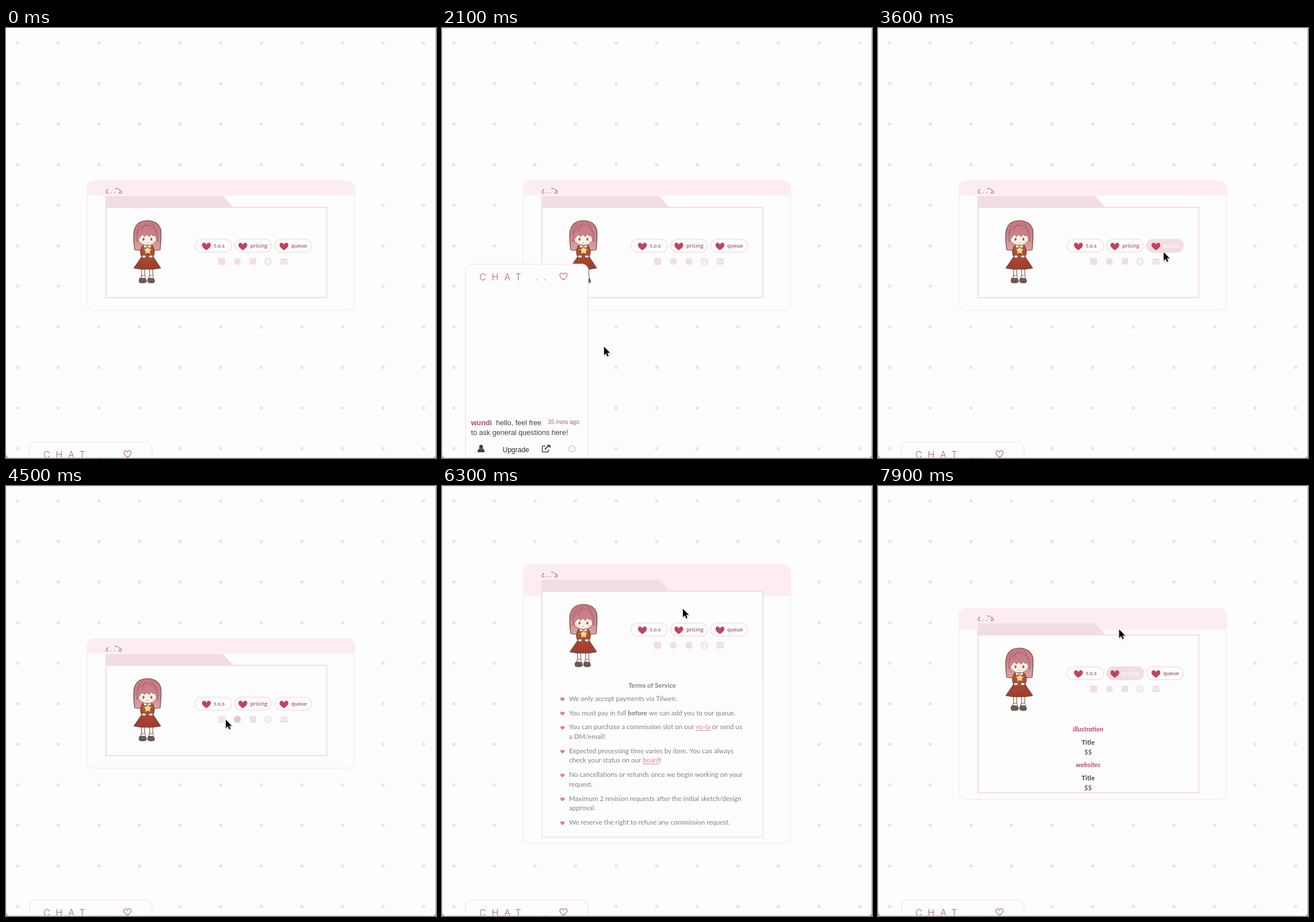
Animation of 748 by 748 pixels, one loop 8 s. Source, as an HTML page with a canvas:

```html
<!DOCTYPE html>
<html lang="en">
<head>
<meta charset="utf-8">
<title>Commission page</title>
<style>
  html, body { margin: 0; width: 100%; height: 100%; overflow: hidden; background: #fdfdfd; }
  canvas { display: block; width: 748px; height: 748px; }
</style>
</head>
<body>
<canvas id="stage"></canvas>
<script>
const SIZE = 748, LOOP = 8000;
const canvas = document.getElementById('stage');
const g = canvas.getContext('2d');
const dpr = window.devicePixelRatio || 1;
canvas.width = canvas.height = SIZE * dpr;

const PAPER = '#fdfdfd', BLUSH = '#fdedf2', PINK = '#f2dde5', ROSE = '#c0455c',
      INK = '#4a3f44', MAUVE = '#ab6371', LINE = '#6a4743';
const SANS = '"Liberation Sans", Arial, sans-serif';
const BODY = 'Lato, sans-serif';

// ---------- timing helpers ----------
const clamp = v => Math.max(0, Math.min(1, v));
const ramp = (t, start, dur) => clamp((t - start) / dur);
const mix = (a, b, k) => a + (b - a) * k;

function bezier(x1, y1, x2, y2) {
  const at = (a, b, s) => 3 * a * s * (1 - s) ** 2 + 3 * b * s * s * (1 - s) + s ** 3;
  return x => {
    if (x <= 0 || x >= 1) return clamp(x);
    let lo = 0, hi = 1;
    for (let i = 0; i < 22; i++) {
      const mid = (lo + hi) / 2;
      if (at(x1, x2, mid) < x) lo = mid; else hi = mid;
    }
    return at(y1, y2, lo);
  };
}
const ease = bezier(.25, .1, .25, 1);
const easeInOut = bezier(.42, 0, .58, 1);

const hover = (t, spans) => spans.reduce((k, [a, b]) =>
  Math.max(k, Math.min(ramp(t, a, 200), 1 - ramp(t, b, 220))), 0);

// ---------- drawing helpers ----------
function paint(p, fill, stroke, width = 1) {
  if (fill) { g.fillStyle = fill; g.fill(p); }
  if (stroke) { g.strokeStyle = stroke; g.lineWidth = width; g.stroke(p); }
}
function path(build, ...style) {
  const p = new Path2D();
  build(p);
  paint(p, ...style);
}
const shape = (d, ...style) => paint(new Path2D(d), ...style);
const oval = (x, y, rx, ry, ...style) =>
  path(p => p.ellipse(x, y, rx, ry, 0, 0, Math.PI * 2), ...style);
const box = (x, y, w, h, r, ...style) =>
  path(p => p.roundRect(x, y, w, h, r), ...style);
const rect = (x, y, w, h, fill) => { g.fillStyle = fill; g.fillRect(x, y, w, h); };

function heart(x, y, w, h, ...style) {
  const a = w / 2, b = h / 2;
  path(p => {
    p.moveTo(x, y + b);
    p.bezierCurveTo(x - a * .3, y + b * .65, x - a, y + b * .2, x - a, y - b * .35);
    p.bezierCurveTo(x - a, y - b * 1.15, x - a * .3, y - b * 1.25, x, y - b * .55);
    p.bezierCurveTo(x + a * .3, y - b * 1.25, x + a, y - b * 1.15, x + a, y - b * .35);
    p.bezierCurveTo(x + a, y + b * .2, x + a * .3, y + b * .65, x, y + b);
    p.closePath();
  }, ...style);
}

function text(str, x, y, font, color, align = 'left', spacing = 0) {
  g.font = font;
  g.fillStyle = color;
  g.textAlign = align;
  g.letterSpacing = spacing + 'px';
  g.fillText(str, x, y);
}

// *bold* and _link_ marks inside a line
function rich(line, x, y) {
  for (const part of line.split(/(\*[^*]+\*|_[^_]+_)/)) {
    if (!part) continue;
    const bold = part[0] === '*', link = part[0] === '_';
    const str = bold || link ? part.slice(1, -1) : part;
    text(str, x, y, (bold ? '700 ' : '') + '11.6px ' + BODY, link ? ROSE : INK);
    const w = g.measureText(str).width;
    if (link) rect(x, y + 1.5, w, 1, ROSE);
    x += w;
  }
}

// ---------- page pieces ----------
function backdrop() {
  rect(0, 0, SIZE, SIZE, PAPER);
  for (let i = 0; i < 11; i++)
    for (let j = 0; j < 11; j++)
      oval(20.4 + i * 70.6, 26 + j * 70.55, 2.8, 2.8, '#e7e4e6');
}

function shade(top, bottom, ...colors) {
  const fill = g.createLinearGradient(0, top, 0, bottom);
  colors.forEach((c, i) => fill.addColorStop(i / (colors.length - 1), c));
  return fill;
}

function girl() {
  g.lineJoin = g.lineCap = 'round';
  const hair = shade(334, 388, '#c87882', '#cb818a', '#dfa8a2');
  shape('M224 386 C222 372 221 357 224 349 C228 338 238 335 246 335 C257 335 266 340 269 350 C271 360 269 376 268 386 L257 387 L235 387 Z', hair, LINE, 1.2);

  for (const x of [238.5, 252.5]) {
    rect(x - 3, 417, 6, 17, '#fbe9de');
    shape(`M${x - 3} 417 V433 M${x + 3} 417 V433`, null, LINE, .9);
    box(x - 4, 431, 8, 6, 2, '#fffaf6', LINE, .8);
  }
  shape('M231.5 440 C231 434 235 434 238 435.5 C243 434 245 438 244 442 C241 444 235 444 232 442.5 Z', '#6c5a57', LINE, 1);
  shape('M246.5 440 C246 434 250 434 252 435.5 C257 434 259 438 258 442.5 C255 444 249 444 247 442 Z', '#6c5a57', LINE, 1);

  const dress = shade(378, 419, '#b65638', '#ac4832', '#a03c2c');
  shape('M237 379 C241 377 251 377 255 379 C259 385 259 392 256 398 L269 417.5 C258 420.5 233 420.5 222.5 417.5 L236 398 C233 392 233 385 237 379 Z', dress, LINE, 1.1);
  shape('M237 400 L233 413 M255 400 L260 413', null, '#923a29', .7);

  oval(246, 366.5, 16.5, 11.5, '#fdeee3', LINE, .8);
  shape('M228 371 C226 356 233 344 246 343 C259 344 266 356 264 371 C261 367 260 363 260 360 L256 362 L253 358 L249 363 L245 359 L241 363 L237 359 C234 362 231 367 228 371 Z', hair, '#8f5860', .8);
  shape('M236 340 C231 345 229 350 228 357 M244 339 C240 343 238 348 237 354 M253 339 C257 343 260 348 261 355', null, '#9d5b66', .9);
  for (const s of [-1, 1]) {
    oval(246 + s * 6.8, 367.3, 1.6, 2.6, '#7a5549');
    oval(246 + s * 6.8 - .5, 366.3, .5, .6, '#ffffff');
    oval(246 + s * 11, 371.5, 2.6, 1.5, '#f8cfc6');
  }
  shape('M245.2 373.4 Q246 374 246.8 373.4', null, LINE, .7);

  shape('M239 377 L246 379 L253 377 L251 383 L246 380 L241 383 Z', '#fff8f2', LINE, .6);
  path(p => {
    for (let i = 0; i < 10; i++) {
      const a = -Math.PI / 2 + i * Math.PI / 5, r = i % 2 ? 4 : 7;
      p.lineTo(246.5 + r * Math.cos(a), 387 + r * Math.sin(a));
    }
    p.closePath();
  }, '#f8dc90', '#b98248', .7);
  for (const s of [-1, 1]) oval(246 + s * 6, 397.5, 3.6, 2.3, '#fff4ea', LINE, .7);
}

function bunny() {
  g.lineCap = 'round';
  shape('M177 280.7 C174.5 281.5 175.5 283.2 177 283.2 C173 283.2 172.5 287.8 178 287.3', null, MAUVE, 1.1);
  oval(182.3, 286.6, .8, .8, MAUVE);
  oval(188.7, 286.6, .8, .8, MAUVE);
  shape('M190.3 278 L192.5 279 L194.7 278 V280.6 L192.5 279.6 L190.3 280.6 Z', MAUVE);
  shape('M196.5 281 C199 281 199 283 197.5 283.2 C202 283.2 202 287.6 198.5 287.5 C196.5 287.3 196 286 197 285.4', null, MAUVE, 1.1);
}

const PILLS = [
  { x: 328, label: 't.o.s', tx: 362, hx: 348.6, on: [[2420, 2690], [5380, 5900]] },
  { x: 397.5, label: 'pricing', tx: 425, hx: 412, on: [[2700, 3000], [6800, 9000]] },
  { x: 467, label: 'queue', tx: 496, hx: 483.5, on: [[3020, 3600], [4950, 5150]] }
];

function pills(t) {
  for (const p of PILLS) {
    const k = hover(t, p.on);
    box(p.x + .5, 367.5, 64, 22.5, 11.25, PAPER, '#f5dce6', 1.4);
    g.save();
    g.globalAlpha *= k;
    box(p.x, 367, 65, 23.5, 11.7, PINK);
    g.restore();
    heart(p.hx, 380.2, 15.4, 13, ROSE);
    const c = [mix(168, 253, k), mix(88, 246, k), mix(106, 249, k)].map(Math.round);
    text(p.label, p.tx, 382, '600 9px "Open Sans", "Noto Sans", sans-serif', `rgb(${c})`);
  }
}

const ICONS = [
  { on: [[4430, 4620]], tint: '#faeff3', draw: c => box(369, 400, 12, 12, 0, c) },
  { on: [[4250, 4460], [4620, 4680]], draw: c => oval(402.5, 406, 6, 6, c) },
  { on: [[4080, 4240], [4690, 4760]], draw: c => box(424, 400.5, 11, 11, 0, c) },
  { on: [[3900, 4070], [4760, 4820]], draw: c => {
    oval(456.3, 406, 6, 6, null, c, 1.3);
    oval(456.3, 406, 2.8, 6, null, c, 1.1);
    shape('M450.3 404 H462.3 M450.3 408 H462.3', null, c, 1.1);
  } },
  { on: [[3700, 3890], [4820, 4920]], draw: c => {
    box(477.5, 401, 13, 10.5, 1.5, c);
    shape('M477.5 403.2 L484 408 L490.5 403.2', null, PAPER, 1.2);
  } }
];

function icons(t) {
  for (const i of ICONS) {
    i.draw('#f3dce5');
    g.save();
    g.globalAlpha *= hover(t, i.on);
    i.draw(i.tint || '#e6bcc7');
    g.restore();
  }
}

const TERMS = [
  ['We only accept payments via Tilwen.'],
  ['You must pay in full *before* we can add you to our queue.'],
  ['You can purchase a commission slot on our _vo-la_ or send us', 'a DM/email!'],
  ['Expected processing time varies by item. You can always', 'check your status on our _board_!'],
  ['No cancellations or refunds once we begin working on your', 'request.'],
  ['Maximum 2 revision requests after the initial sketch/design', 'approval.'],
  ['We reserve the right to refuse any commission request.']
];

function terms() {
  text('Terms of Service', 365.5, 215, '700 11.3px ' + BODY, INK, 'center');
  let y = 237.7;
  for (const item of TERMS) {
    heart(209.6, y - 2.6, 7.6, 6.6, ROSE);
    item.forEach((line, i) => rich(line, 221, y + i * 16.6));
    y += 24.85 + (item.length - 1) * 16.6;
  }
}

function prices() {
  ['illustration', 'websites'].forEach((name, i) => {
    const y = 215 + i * 62;
    text(name, 365.5, y, 'italic 700 11.6px ' + BODY, ROSE, 'center');
    text('Title', 365.5, y + 23, '700 11.6px ' + BODY, INK, 'center');
    text('$$', 365.5, y + 39.6, '11.6px ' + BODY, INK, 'center');
  });
}

function section(alpha, bottom, draw) {
  if (alpha <= 0) return;
  g.save();
  g.globalAlpha = alpha;
  rect(173, 203, 2, bottom - 203, PINK);
  rect(557, 203, 2, bottom - 203, PINK);
  rect(173, bottom, 386, 2, PINK);
  if (draw) draw();
  g.restore();
}

function panel(t) {
  let h = mix(226, 485, easeInOut(ramp(t, 5800, 350)));
  h = mix(h, 333, easeInOut(ramp(t, 7250, 350)));
  const top = Math.floor(378.5 - h / 2);

  g.save();
  g.translate(0, top);
  box(140, 0, 467, h, 14, PAPER);
  g.save();
  g.beginPath();
  g.roundRect(140, 0, 467, h, 14);
  g.clip();
  rect(140, 0, 467, h * .1125 + 1, BLUSH);
  g.restore();
  box(141, 1, 465, h - 1, 13, null, BLUSH, 2);

  rect(173, 46, 386, 157, PAPER);
  shape('M173 27 H377 L396 47 H173 Z', PINK);
  rect(173, 46, 386, 2, PINK);
  rect(173, 46, 2, 157, PINK);
  rect(557, 46, 2, 157, PINK);

  section(1 - ramp(t, 5580, 200), 203);
  section(Math.min(ease(ramp(t, 6185, 300)), 1 - ramp(t, 6980, 230)), h - 11, terms);
  section(ease(ramp(t, 7560, 300)), h - 12, prices);

  g.translate(0, -265);
  bunny();
  girl();
  pills(t);
  icons(t);
  g.restore();
}

function chat(t) {
  const open = ease(ramp(t, 350, 1000)) - ease(ramp(t, 1985, 1000));
  g.save();
  g.translate(0, Math.round(mix(719, 367, open)));
  box(41, 1, 213, 420, 11, PAPER, '#fdeaf0', 2);
  text('CHAT ..', 65, 28.5, '300 16px Inter, sans-serif', MAUVE, 'left', 9.9);
  heart(211.3, 22.3, 12.6, 12, null, MAUVE, 1.1);

  text('wundi', 50.5, 280.5, `700 12.6px ${SANS}`, ROSE);
  text('hello, feel free', 94, 280.5, `12.6px ${SANS}`, INK);
  text('35 mins ago', 239, 279, `10.1px ${SANS}`, MAUVE, 'right');
  text('to ask general questions here!', 50.5, 297.5, `12.6px ${SANS}`, INK);

  oval(68, 318.7, 3.3, 3.7, INK);
  shape('M62 328 C61.5 323.5 64 321.5 66 321.8 Q68 323.5 70 321.8 C72 321.5 74.5 323.5 74 328 Z', INK);
  text('Upgrade', 105.5, 327.5, `12px ${SANS}`, '#33292d');
  shape('M180 317 H176 Q174.5 317 174.5 318.5 V326 Q174.5 327.5 176 327.5 H183.5 Q185 327.5 185 326 V323', null, INK, 1.5);
  shape('M179 323 L186 316', null, INK, 2);
  shape('M182.5 315 H188.5 V321 Z', INK);
  oval(226.5, 322, 5.5, 5.5, null, '#d9cbd1', 1.6);

  text('name', 85, 353.5, `12.6px ${SANS}`, '#a39a9e');
  shape('M221 347.5 H225 V344 L230.5 349 L225 354 V350.5 H221 Z', '#cfc6ca');
  shape('M229 344 H232 Q233.5 344 233.5 345.5 V352.5 Q233.5 354 232 354 H229', null, '#cfc6ca', 1.4);

  oval(67.3, 370.5, 5.8, 5.8, null, INK, 1.3);
  oval(65.3, 369, .9, 1, INK);
  oval(69.3, 369, .9, 1, INK);
  shape('M64.3 372 Q67.3 375.5 70.3 372', null, INK, 1.1);
  text('message', 85, 376.5, `12.6px ${SANS}`, '#a39a9e');
  g.restore();
}

// time, x, y
const ROUTE = [
  [100, 604, 700], [360, 205, 735], [900, 215, 728], [1400, 222, 723], [1750, 235, 690],
  [1950, 262, 600], [2420, 352, 386], [2700, 402, 382], [3100, 485, 381], [3500, 500, 384],
  [3800, 485, 407], [4500, 382, 406], [4880, 484, 405], [5050, 492, 384], [5420, 376, 380],
  [5800, 372, 379], [6250, 418.5, 213], [6550, 418.5, 213], [6900, 427, 248],
  [7300, 425, 246], [7600, 420, 248], [7900, 419, 249]
];

function cursor(t) {
  if (t < ROUTE[0][0]) return;
  let i = ROUTE.findIndex(p => p[0] > t);
  if (i < 0) i = ROUTE.length - 1;
  const [ta, xa, ya] = ROUTE[i - 1], [tb, xb, yb] = ROUTE[i];
  const k = easeInOut(ramp(t, ta, tb - ta));
  g.save();
  g.translate(mix(xa, xb, k) + .5, mix(ya, yb, k) + .5);
  g.scale(.92, .92);
  g.lineJoin = 'miter';
  g.shadowColor = 'rgba(0,0,0,.3)';
  g.shadowBlur = 2 * dpr;
  g.shadowOffsetY = dpr;
  const arrow = 'M0 0 V16 L3.7 12.6 L6.2 18.3 L8.7 17.2 L6.2 11.6 H11.3 Z';
  shape(arrow, null, '#ffffff', 2);
  g.shadowColor = 'transparent';
  shape(arrow, '#000000');
  g.restore();
}

function windowEdge(t) {
  rect(747, 0, 1, SIZE, '#b4b4b4');
  if (t >= 1900) {
    rect(0, 0, SIZE, 1, '#dedede');
    rect(0, 0, 1, SIZE, '#dedede');
  }
  rect(8, 747, SIZE - 16, 1, '#d2d2d2');
  shape('M0 739 Q0 748 9 748 H0 Z', '#a8a8a8');
  shape('M748 739 Q748 748 739 748 H748 Z', '#a8a8a8');
}

const start = performance.now();

function frame() {
  const t = (performance.now() - start) % LOOP;
  g.setTransform(dpr, 0, 0, dpr, 0, 0);
  backdrop();
  panel(t);
  chat(t);
  windowEdge(t);
  cursor(t);
  requestAnimationFrame(frame);
}
frame();
</script>
</body>
</html>
```
